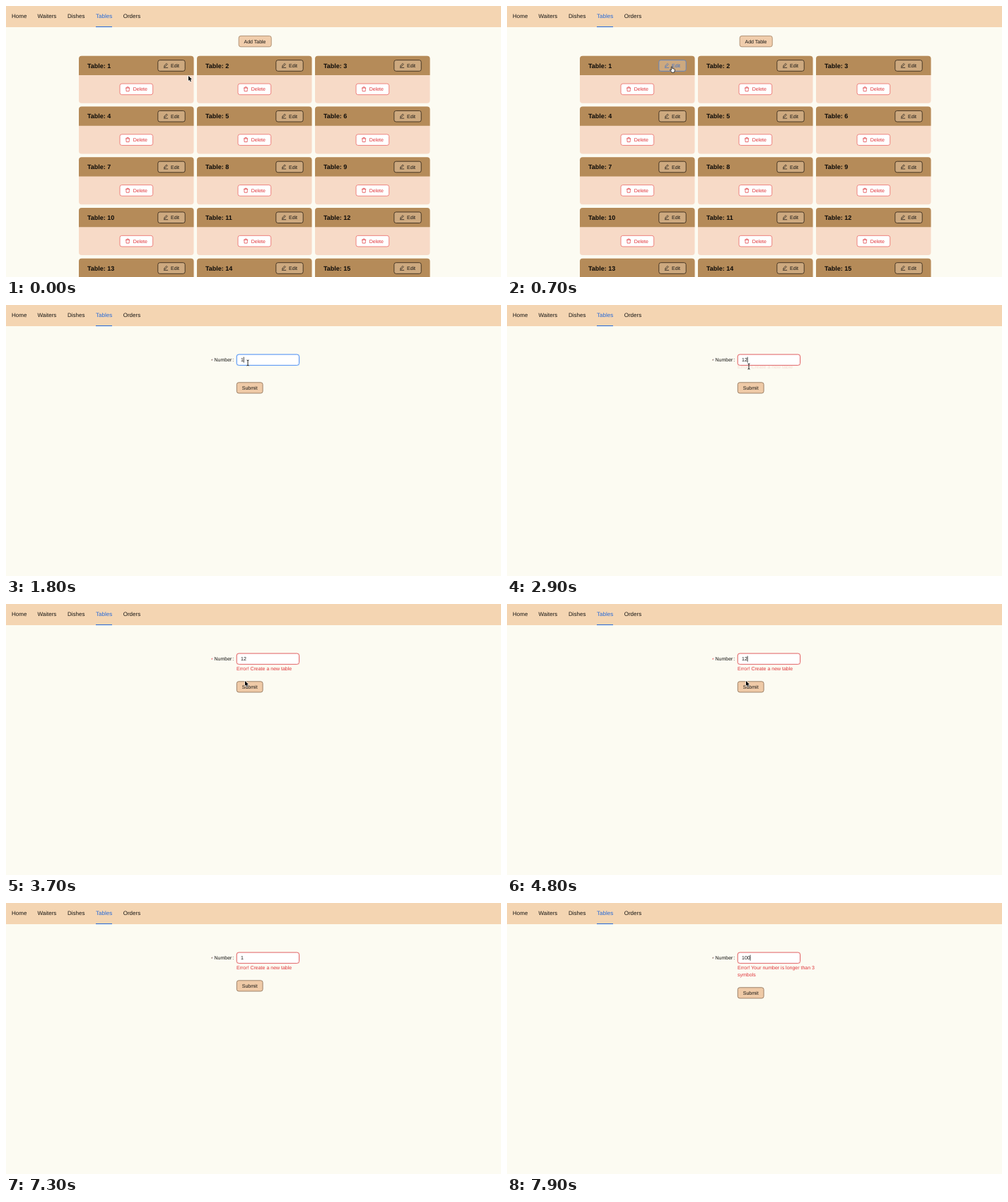
Recreate the animation shown at these times as an HTML page with a canvas. Size 700x384 px, loop 8000 ms.

```html
<!DOCTYPE html>
<html lang="en">
<head>
<meta charset="utf-8">
<title>Tables</title>
<style>
html, body { margin: 0; width: 100%; height: 100%; overflow: hidden; background: #fcfbf2; }
canvas { display: block; width: 700px; height: 384px; }
</style>
</head>
<body>
<canvas id="stage"></canvas>
<script>
const W = 700, H = 384, LOOP = 8000, STEP = 100;
const BLUE = '#2468d8', RED = '#df3338', INK = '#151412';
const canvas = document.getElementById('stage');
const ctx = canvas.getContext('2d');
const dpr = window.devicePixelRatio || 1;
canvas.width = W * dpr;
canvas.height = H * dpr;

const clamp = v => Math.max(0, Math.min(1, v));
const lerp = (a, b, p) => a + (b - a) * p;
const ease = p => p * p * (3 - 2 * p);
const ramp = (t, from, to) => clamp((t - from) / (to - from));

function text(str, x, y, color = INK, size = 7, weight = 400) {
  ctx.font = `${weight} ${size}px "Liberation Sans", Arial, sans-serif`;
  ctx.fillStyle = color;
  ctx.fillText(str, x, y);
}

function box(x, y, w, h, r, fill, stroke, line = 0.7) {
  ctx.beginPath();
  ctx.roundRect(x, y, w, h, r);
  if (fill) { ctx.fillStyle = fill; ctx.fill(); }
  if (stroke) { ctx.strokeStyle = stroke; ctx.lineWidth = line; ctx.stroke(); }
}

function path(points, close) {
  ctx.beginPath();
  points.forEach(([x, y], i) => i ? ctx.lineTo(x, y) : ctx.moveTo(x, y));
  if (close) ctx.closePath();
}

function at(x, y, draw) {
  ctx.save();
  ctx.translate(x, y);
  draw();
  ctx.restore();
}

function pencil(x, y, color) {
  at(x, y, () => {
    ctx.strokeStyle = color;
    ctx.lineWidth = 0.7;
    path([[0.9, 5], [1.2, 3.4], [4.4, 0.3], [5.6, 1.5], [2.5, 4.7]], true);
    ctx.stroke();
    path([[0.2, 6.3], [6.4, 6.3]]);
    ctx.stroke();
  });
}

function trash(x, y) {
  at(x, y, () => {
    ctx.strokeStyle = RED;
    ctx.lineWidth = 0.7;
    path([[0, 1.6], [6.2, 1.6]]);
    ctx.stroke();
    path([[1.9, 1.5], [1.9, 0.3], [4.3, 0.3], [4.3, 1.5]]);
    ctx.stroke();
    path([[0.8, 1.6], [1.1, 6.3], [5.1, 6.3], [5.4, 1.6]]);
    ctx.stroke();
  });
}

function nav() {
  ctx.fillStyle = '#f4d5b2';
  ctx.fillRect(0, 0, W, 30);
  [['Home', 8], ['Waiters', 44.5], ['Dishes', 87], ['Tables', 127], ['Orders', 165.7]]
    .forEach(([name, x]) => text(name, x, 17.3, name === 'Tables' ? BLUE : INK, 8));
  ctx.fillStyle = BLUE;
  ctx.fillRect(127, 29, 23, 1);
}

function card(n, x, y, hot) {
  box(x, y, 162.5, 67, 4, '#f7dac7');
  box(x, y, 162.5, 27.2, [4, 4, 0, 0], '#b58b59');
  text('Table: ' + n, x + 12, y + 17, '#0c0a08', 9, 700);
  const color = hot ? '#3a70cb' : INK;
  box(x + 111.8, y + 6, 38.4, 15.6, 2.8, '#cda97f', hot ? '#5b83c4' : '#3b2d1d', 0.9);
  pencil(x + 119.7, y + 10.4, color);
  text('Edit', x + 130, y + 16.3, color);
  box(x + 58, y + 39.4, 46.7, 15.6, 2.8, '#fff', '#ec7773', 0.9);
  trash(x + 66, y + 43.8);
  text('Delete', x + 76.7, y + 49.7, RED);
}

function listPage(t) {
  box(329.2, 42.4, 46, 15.4, 2.8, '#f0cdac', '#ab8b6d', 0.9);
  text('Add Table', 336.5, 52.6);
  for (let i = 0; i < 15; i++) {
    const x = 103 + (i % 3) * 167, y = 70.7 + Math.floor(i / 3) * 71.75;
    card(i + 1, x, y, i === 0 && t >= 400);
  }
}

function value(t) {
  if (t < 2700) return '1';
  if (t < 5800) return '12';
  if (t < 7500) return '1';
  return t < 7800 ? '10' : '100';
}

function caretOn(t) {
  if (t < 1800) return false;
  const typing = (t >= 2700 && t < 2800) || t >= 7500;
  return typing || Math.floor((t - 1800) / 500) % 2 === 0;
}

function field(t) {
  let edge = '#d9d9d7', glow = null;
  if (t >= 2700) { edge = '#de5a5d'; glow = 'rgba(255,60,50,.12)'; }
  else if (t >= 1800) { edge = '#3f86f2'; glow = 'rgba(5,110,255,.12)'; }
  else if (t >= 1700) edge = '#76a9f3';
  if (glow) box(325.2, 69.2, 90.4, 17, 3.5, glow);
  box(326.3, 70.1, 88.2, 15.3, 3, '#fff', edge, 0.9);
  const str = value(t);
  text(str, 332, 80.2);
  if (caretOn(t)) {
    ctx.fillStyle = '#111';
    ctx.fillRect(332 + ctx.measureText(str).width - 0.1, 73.6, 0.8, 8);
  }
}

function errors(t) {
  if (t < 2900) return;
  const p = t < 3200 ? lerp(0.15, 1, ramp(t, 2900, 3200)) : 1;
  ctx.save();
  ctx.beginPath();
  ctx.rect(320, 86, 130, lerp(1, 24, p));
  ctx.clip();
  ctx.globalAlpha = p;
  const y = 93.6 - 4 * (1 - p);
  if (t < 7800) {
    text('Error! Create a new table', 326, y, RED);
  } else {
    text('Error! Your number is longer than 3', 326, y, RED);
    text('symbols', 326, y + 10.8, RED);
  }
  ctx.restore();
}

function formPage(t) {
  text('*', 290, 80.6, t >= 3500 && t < 5800 ? '#e04348' : '#6d4e49', 6.5);
  text('Number', 294.5, 80.2);
  text(':', 320.3, 80.2);
  field(t);
  errors(t);
  const y = 109.8 + 10 * ramp(t, 7700, 7900);
  box(326.3, y, 36.8, 15.2, 2.8, '#efcaa7', '#93785f', 0.9);
  text('Submit', 333.8, y + 10.2);
}

function arrow(x, y) {
  at(x, y, () => {
    path([[0, 0], [0, 7], [1.6, 5.6], [2.7, 8.2], [3.9, 7.7], [2.8, 5.2], [4.9, 5]], true);
    ctx.strokeStyle = '#fff';
    ctx.lineWidth = 1.1;
    ctx.stroke();
    ctx.fillStyle = '#000';
    ctx.fill();
  });
}

function hand(x, y) {
  at(x, y, () => {
    path([[-0.7, 0.2], [0, -0.4], [0.7, 0.2], [0.8, 2.6], [2, 2.7], [3.2, 3.1], [4.3, 3.7],
      [4.2, 6], [3.4, 8.2], [0, 8.2], [-1.2, 6.4], [-2.5, 4.6], [-1.8, 4.1], [-0.7, 5]], true);
    ctx.fillStyle = '#fff';
    ctx.fill();
    ctx.strokeStyle = '#111';
    ctx.lineWidth = 0.8;
    ctx.stroke();
  });
}

function beam(x, y) {
  at(x, y, () => {
    ctx.strokeStyle = '#111';
    ctx.lineWidth = 0.9;
    path([[0, -3.5], [0, 3.5]]);
    ctx.stroke();
    for (const s of [-1, 1]) {
      path([[-1.5, 4 * s], [0, 3.4 * s], [1.5, 4 * s]]);
      ctx.stroke();
    }
  });
}

// time, x, y
const route = [
  [0, 258, 99], [500, 233, 86], [1000, 233, 86], [1400, 300, 108],
  [1800, 342, 82], [2700, 342, 82], [2900, 342, 87], [3300, 338, 109], [LOOP, 338, 109]
];

function pointer(t) {
  if (t >= 5800) return;
  const i = route.findIndex(k => k[0] > t);
  const [t0, x0, y0] = route[i - 1], [t1, x1, y1] = route[i];
  const p = ease(ramp(t, t0, t1));
  const x = lerp(x0, x1, p), y = lerp(y0, y1, p);
  if (t >= 400 && t < 800) hand(x, y);
  else if (t >= 1700 && t <= 2900) beam(x, y);
  else arrow(x, y);
}

function render(t) {
  ctx.setTransform(dpr, 0, 0, dpr, 0, 0);
  ctx.textRendering = 'geometricPrecision';
  ctx.lineJoin = 'round';
  ctx.fillStyle = '#fcfbf2';
  ctx.fillRect(0, 0, W, H);
  nav();
  if (t < 800) listPage(t);
  else formPage(t);
  pointer(t);
}

const start = performance.now();
function loop() {
  const t = (performance.now() - start) % LOOP;
  render(Math.floor(t / STEP) * STEP);
  requestAnimationFrame(loop);
}
loop();
</script>
</body>
</html>
```
